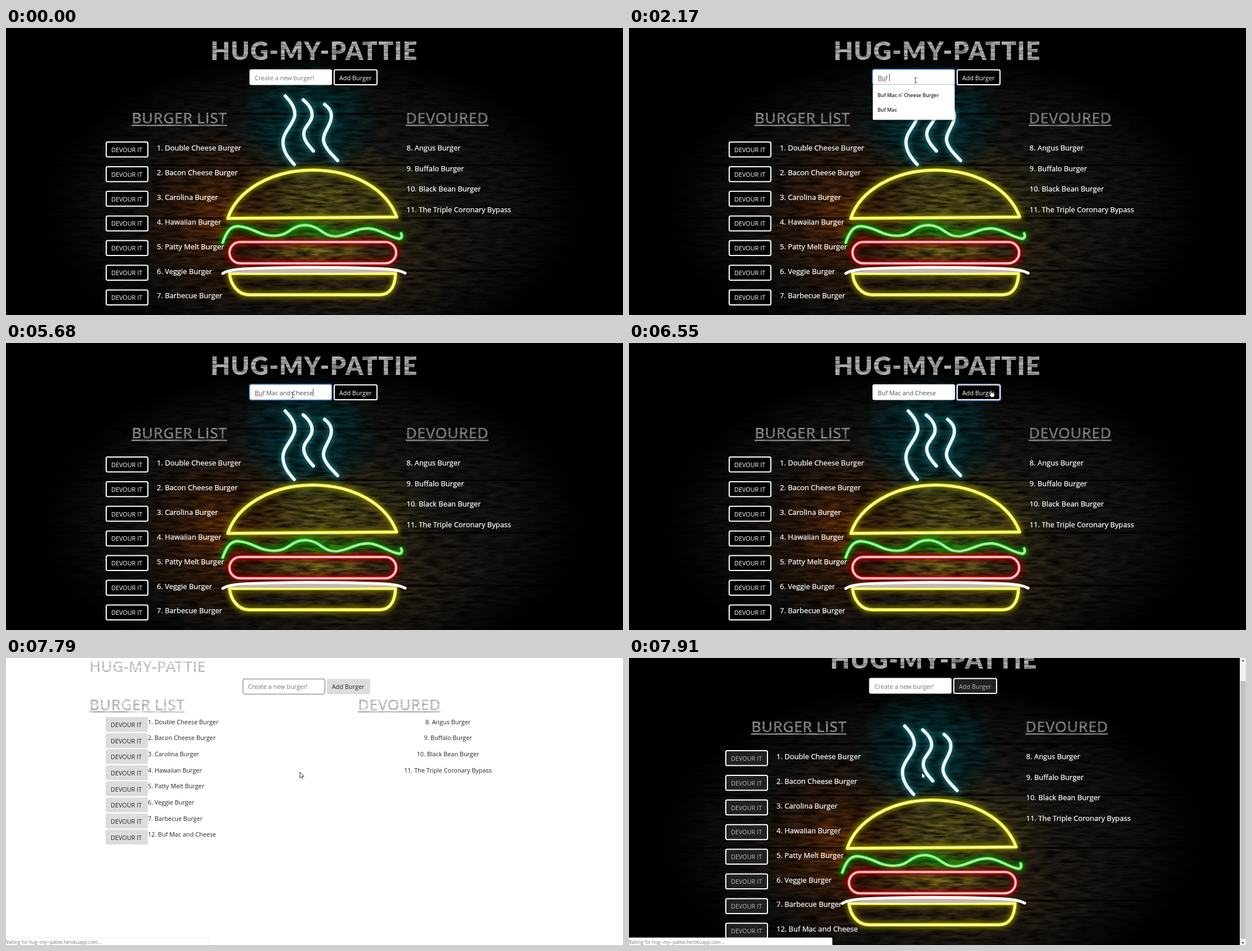
Write an HTML page that moves like this. It is 1096x511 px and loops after 7.99 s.

```html
<!DOCTYPE html>
<html lang="en">
<head>
<meta charset="utf-8">
<title>Burger list</title>
<style>
html, body { margin: 0; width: 100%; height: 100%; overflow: hidden; background: #000; }
#wood, svg { position: absolute; left: 0; top: 0; width: 1096px; height: 511px; overflow: hidden; }
#wood {
  will-change: transform;
  background:
    radial-gradient(130px 110px at 536px 165px, #06383c, #053034 50%, transparent),
    radial-gradient(90px 30px at 545px 364px, #2c8a10, transparent),
    radial-gradient(110px 50px at 545px 392px, #8a7420, transparent),
    radial-gradient(150px 170px at 375px 340px, #75360a, #4a220699 50%, transparent),
    radial-gradient(200px 110px at 565px 305px, #6e651e, #524a1a99 55%, transparent),
    radial-gradient(260px 150px at 600px 410px, #4e3a18, #3a2a1466 60%, transparent),
    radial-gradient(480px 280px at 545px 320px, #2c241e, #1c1a18 50%, #131313 75%, #000);
}
text { font-family: "Open Sans", "Noto Sans", sans-serif; font-size: 10.85px; white-space: pre; }
.item { font-size: 12.95px; fill: #fff; stroke: #fff; stroke-width: .25px; }
.head { font-size: 27.4px; font-weight: 600; }
.line { text-decoration: underline 2px; text-underline-offset: 2px; }
.title { font: 900 44.5px Lato, sans-serif; letter-spacing: 1.3px; text-anchor: middle; }
.hint { font-size: 8.85px; font-weight: 600; fill: #222; }
.mid { text-anchor: middle; }
</style>
</head>
<body>
<div id="wood"></div>
<svg id="page" viewBox="0 0 1096 511"></svg>
<script>
const LOOP = 7990;
const $ = id => document.getElementById(id);
const title = 'HUG-MY-PATTIE';
const burgers = ['1. Double Cheese Burger', '2. Bacon Cheese Burger', '3. Carolina Burger', '4. Hawaiian Burger',
  '5. Patty Melt Burger', '6. Veggie Burger', '7. Barbecue Burger', '12. Buf Mac and Cheese'];
const eaten = ['8. Angus Burger', '9. Buffalo Burger', '10. Black Bean Burger', '11. The Triple Coronary Bypass'];
const typed = 'Buf Mac and Cheese';
const keys = [1670, 1880, 1980, 2170, 2760, 2880, 3060, 3120, 3380, 3470, 3570, 3670, 3920, 4050, 4240, 4300, 4480, 4620];
// start, end, from x, from y, to x, to y
const moves = [[100, 880, 984, 478, 509, 93], [5910, 6480, 509, 93, 643, 84], [6980, 7730, 643, 84, 522, 203]];

const text = (x, y, s, attrs = 'fill="#212529"') => `<text x="${x}" y="${y}" ${attrs}>${s}</text>`;
const rect = (x, y, w, h, attrs = '') => `<rect x="${x}" y="${y}" width="${w}" height="${h}" ${attrs}/>`;
const group = (id, body, attrs = '') => `<g id="${id}" ${attrs}>${body}</g>`;
const grain = (id, c) => `<filter id="${id}" color-interpolation-filters="sRGB">
  <feTurbulence type="fractalNoise" baseFrequency=".04 .4" numOctaves="3" seed="8"/>
  <feColorMatrix values="0 0 0 0 ${c} 0 0 0 0 ${c} 0 0 0 0 ${c} 2 0 0 0 -.8"/>
  <feComposite in2="SourceGraphic" operator="atop"/></filter>`;
const blur = (id, r) => `<filter id="${id}" filterUnits="userSpaceOnUse" x="0" y="0" width="1096" height="511">
  <feGaussianBlur stdDeviation="${r}"/></filter>`;
const neon = (d, glow, edge, core) => `<path d="${d}" stroke="${glow}" stroke-width="12" opacity=".75" filter="url(#soft)"/>
  <path d="${d}" stroke="${edge}" stroke-width="6"/>
  <path d="${d}" stroke="${core}" stroke-width="3.2" filter="url(#fine)"/>`;

const steam = ['M496 121C505 130 514 142 513 155C511 172 492 185 492 203C492 220 502 232 512 243',
  'M528 128C540 138 546 148 543 160C539 172 528 178 529 190C530 202 540 212 546 219',
  'M566 136C576 144 580 152 577 164C573 178 563 188 564 200C566 214 580 226 589 236'];

$('wood').innerHTML = `<svg viewBox="0 0 1096 511"><defs>
  <filter id="bark" x="0" y="0" width="1" height="1" color-interpolation-filters="sRGB">
    <feTurbulence type="fractalNoise" baseFrequency=".035 .2" numOctaves="5" seed="3"/>
    <feColorMatrix values="0 0 0 0 0 0 0 0 0 0 0 0 0 0 0 1.5 0 0 0 -.4"/></filter>
  ${blur('soft', 4.5)}${blur('fine', .6)}</defs>
  ${rect(0, 0, 1096, 511, 'filter="url(#bark)"')}
  ${[153, 244.5, 338, 432].map(y => rect(0, y - 1.5, 1096, 3, 'opacity=".8"')).join('')}
  <g fill="none" stroke-linecap="round" stroke-linejoin="round">
  ${steam.map(d => neon(d, '#1f7480', '#d8f6fb', '#fff')).join('')}
  ${neon('M394 339C410 290 470 253 545 253C615 253 675 285 694 336.5Z', '#8c8c00', '#e2e200', '#ffffb8')}
  ${neon('M385 382C391 365 398 352 413 353C440 355 450 371 478 370C505 369 505 351 533 351C560 353 562 372 588 371C610 368 625 355 647 357C665 359 680 372 697 375C703 376 704 370 702 366', '#0a8a0a', '#19d419', '#c8ffc0')}
  ${neon('M416 381H674A19 19 0 0 1 674 419H416A19 19 0 0 1 416 381Z', '#9a0000', '#e8202c', '#ffe0e0')}
  ${neon('M397 437H692C691 460 682 475 664 475H432C412 475 399 457 397 437Z', '#8c8c00', '#e2e200', '#ffffb8')}
  <path d="M390 435Q547 418 705 434Q547 438 390 435Z" fill="#c4b8ac"/>
  <path d="M385 437Q395 430 430 428.500Q547 424 665 428.500Q698 430 709 436.500" stroke="#fff" stroke-width="5"/>
  </g></svg>`;

const rows = burgers.map((s, i) => {
  const y = i * 43.9;
  return group('row' + i, rect(178, 203 + y, 74, 26.5, 'class="btn" rx="2.5" stroke="#fff" stroke-width="2"') +
    text(187, 220.7 + y, 'DEVOUR IT', 'class="label"') + text(268, 218 + y, s, 'class="item"'));
}).join('');

const plainRows = burgers.map((s, i) => {
  const y = i * 28.65;
  return rect(177, 105 + y, 75, 26.5, 'rx="3" fill="#dcdcdc"') + text(186, 123 + y, 'DEVOUR IT') + text(252, 117.7 + y, s);
}).join('');

const ink = 'fill="#fff" stroke="#000" stroke-width=".8" stroke-linejoin="round"';

$('page').innerHTML = `<defs>${grain('dark', .2)}${grain('pale', 1)}${blur('shade', 2)}</defs>` +
  group('styled',
    text(547.5, 57, title, 'class="title" fill="#b4b4b0" filter="url(#dark)"') +
    text(223, 170, 'BURGER LIST', 'class="head line" fill="#8a8a8a" filter="url(#dark)"') +
    text(710, 170, 'DEVOURED', 'class="head line" fill="#808080" filter="url(#dark)"') +
    rows + eaten.map((s, i) => text(711.5, 218 + i * 36.6, s, 'class="item"')).join('') +
    rect(430.5, 71.5, 150, 32, 'id="ring" rx="4" fill="#001f40"') +
    rect(432.5, 73.5, 146.5, 28, 'rx="3" fill="#fff"') +
    rect(433, 74, 145.5, 27, 'id="edge" rx="3" fill="none" stroke="#5b93d6"') +
    text(442, 92.6, 'Create a new burger!', 'id="empty" fill="#6c757d"') +
    text(442, 92.6, '', 'id="value" fill="#495057"') +
    '<path id="wavy" d="M442 95l1.500-1.500l1.500 1.500l1.500-1.500l1.500 1.500l1.500-1.500l1.500 1.500l1.500-1.500l1.500 1.500l1.500-1.500l1.500 1.500" fill="none" stroke="#e03030" stroke-width=".8"/>' +
    rect(442, 81, 1, 14, 'id="caret" fill="#495057"') +
    rect(580.5, 72, 81, 32, 'id="btnRing" rx="5" fill="#274b85"') +
    rect(583, 74.5, 76, 26.5, 'class="btn" rx="2.5" stroke="#fff" stroke-width="2"') +
    text(592, 92.6, 'Add Burger', 'class="label"') +
    group('menu', rect(433, 103, 146, 62, 'class="sheet" opacity=".4" filter="url(#shade)"') +
      rect(433, 101, 145.5, 62.5, 'class="sheet" rx="1.5" fill="#fff"') +
      text(441.5, 122.7, "Buf Mac n' Cheese Burger", 'class="hint"') +
      text(441.5, 148.7, 'Buf Mac', 'id="second" class="hint"'))) +
  group('plain', rect(0, 0, 1096, 511, 'fill="#fff"') +
    text(148, 25, title, 'class="head" fill="#b8b8b8" filter="url(#pale)"') +
    text(148, 92.5, 'BURGER LIST', 'class="head line" fill="#b0b0b0" filter="url(#pale)"') +
    text(625, 92.5, 'DEVOURED', 'class="head line" fill="#b0b0b0" filter="url(#pale)"') +
    rect(421, 37.3, 145.5, 27, 'rx="3" fill="#fff" stroke="#6b6b6b"') +
    text(430, 55, 'Create a new burger!', 'fill="#6c757d"') +
    rect(570, 37, 77, 27.5, 'rx="3" fill="#dcdcdc"') + text(579, 55, 'Add Burger') + plainRows +
    eaten.map((s, i) => text(785, 117.7 + i * 28.65, s, 'class="mid" fill="#212529"')).join('')) +
  group('bar', rect(1085, 0, 11, 511, 'fill="#f1f1f1"') + rect(1086, 41, 9.5, 459, 'fill="#c1c1c1"') +
    '<path d="M1088 6l2.500-3l2.500 3zM1088 506l2.500 3l2.500-3z" fill="#505050"/>') +
  group('status', rect(-2, 498, 363, 15, 'rx="2" fill="#fff" stroke="#ddd" stroke-width=".6"') +
    text(-3, 508.7, 'Waiting for hug--my--pattie.herokuapp.com...', 'fill="#777" style="font-size:8.23px"')) +
  group('cursor',
    `<path id="arrow" d="M0 0V10.500L2.500 8.300L4 11.500L5.600 10.800L4.100 7.700H7.400Z" ${ink}/>` +
    '<path id="beam" d="M-2.500-4.500H-.7L0-4L.7-4.500H2.500M0-4V4M-2.500 4.500H-.7L0 4L.7 4.500H2.500" fill="none" stroke="#444" stroke-width="1"/>' +
    `<path id="hand" d="M-1 6V1Q0-.5 1 1V4.500L5.500 5.500Q6.500 6 6.300 8L5.300 12.500H-.2L-3 8.500Q-3 6.500-1 8Z" ${ink}/>`);

const show = (id, on) => { $(id).style.display = on ? '' : 'none'; };
const set = (el, name, v) => { if (el.getAttribute(name) !== String(v)) el.setAttribute(name, v); };
const setAll = (css, name, v) => document.querySelectorAll(css).forEach(el => set(el, name, v));
const clamp = v => Math.max(0, Math.min(1, v));
const within = (v, a, b) => v >= a && v < b;

function drawCursor(t, fresh) {
  const m = moves.findLast(m => t >= m[0]);
  show('cursor', m);
  if (!m) return;
  const p = clamp((t - m[0]) / (m[1] - m[0])), e = p * p * (3 - 2 * p);
  let x = m[2] + (m[4] - m[2]) * e, y = m[3] + (m[5] - m[3]) * e;
  if (fresh) { x = 520; y = 204; }
  const inRow = within(y, 73, 102);
  const kind = inRow && within(x, 432, 579) ? 'beam' : inRow && within(x, 582, 660) ? 'hand' : 'arrow';
  for (const k of ['arrow', 'beam', 'hand']) show(k, k === kind);
  set($('cursor'), 'transform', `translate(${x.toFixed(1)} ${y.toFixed(1)})`);
}

function draw(t) {
  const fresh = t >= 7860;
  const focus = within(t, 880, 6500);
  const count = fresh ? 0 : keys.filter(k => k <= t).length;

  show('plain', within(t, 7790, 7860));
  show('status', t >= 7040);
  show('bar', fresh);
  show('row7', fresh);
  set($('styled'), 'transform', fresh ? 'translate(-6 -38)' : 'translate(0 0)');
  $('wood').style.transform = fresh ? 'translateX(-6.3px)' : 'none';

  // buttons fade from the browser's grey to black after the reload
  const late = t >= 7910;
  setAll('.btn', 'fill', !fresh ? '#000' : late ? '#212121' : '#909090');
  setAll('.label', 'fill', !fresh ? '#fff' : late ? '#bcbcbc' : '#555');

  const glow = focus ? clamp((t - 880) / 170) : 0;
  set($('ring'), 'opacity', glow);
  set($('edge'), 'opacity', glow);
  set($('btnRing'), 'opacity', fresh ? 0 : clamp((t - 6500) / 50));

  const value = $('value'), s = typed.slice(0, count);
  if (value.textContent !== s) value.textContent = s;
  show('empty', !count);
  show('wavy', focus && count > 3);
  const since = t - (count ? keys[count - 1] : 880);
  show('caret', focus && since % 1040 < 520);
  set($('caret'), 'x', 442 + (count ? value.getComputedTextLength() : 0));

  show('menu', within(t, 1000, 3380));
  show('second', t < 3120);
  setAll('.sheet', 'height', t < 3120 ? 62.5 : 36.5);
  drawCursor(t, fresh);
}

const start = performance.now();
function tick() {
  draw((performance.now() - start) % LOOP);
  requestAnimationFrame(tick);
}
tick();
</script>
</body>
</html>
```
